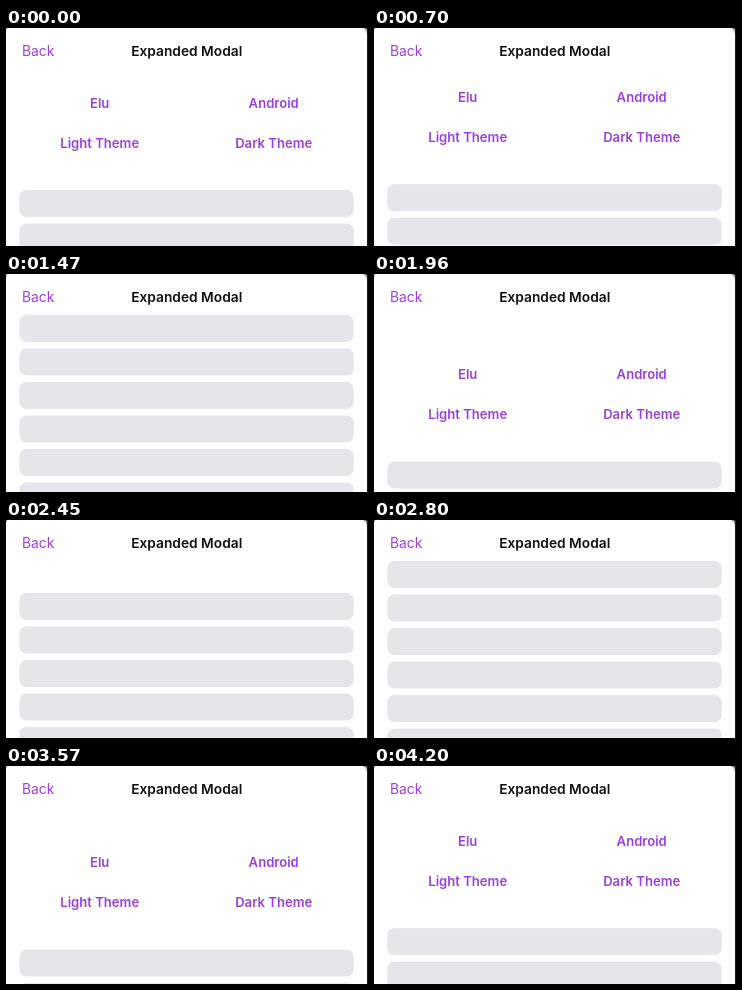
Recreate the animation shown at these times as an HTML page with a canvas. Size 362 by 218 pixels, loop 4.34 s.

```html
<!DOCTYPE html>
<html lang="en">
<head>
<meta charset="utf-8">
<title>Expanded Modal</title>
<style>
  html, body { margin: 0; width: 100%; height: 100%; overflow: hidden; background: #fff; }
  canvas { display: block; }
</style>
</head>
<body>
<canvas id="stage" width="362" height="218"></canvas>
<script>
const W = 362, H = 218, LOOP = 4340, STEP = 70;
const HEADER = 40.5, FIRST_BAR = 162, PITCH = 33.5;
const SCROLL_END = 121, OVERSHOOT = 25.5, PULL_TIME = 490;
const PURPLE = '#9a3fdb', INK = '#101012', BAR = '#e5e5ea';
const FONT = 'Inter, Roboto, sans-serif';
const ctx = document.getElementById('stage').getContext('2d');

// Each rule runs from 0 to 1 over the elapsed milliseconds.
const flick = ms => 1 - Math.exp(-((Math.max(ms, 0) / 235) ** 2.5));

function pull(ms) {
  const u = Math.min(Math.max(ms / PULL_TIME, 0), 1);
  return u < 0.5 ? 16 * u ** 5 : 1 - 16 * (1 - u) ** 5;
}

function bounce(ms) {
  const k = Math.max(ms, 0) / 100;
  return 1 - (1 + k) * Math.exp(-k);
}

// One flick up, then a pull down past the start and a spring back.
function swipe(t, up, down) {
  return SCROLL_END * flick(t - up)
       - (SCROLL_END + OVERSHOOT) * pull(t - down)
       + OVERSHOOT * bounce(t - down - PULL_TIME);
}

const scrollAt = t => swipe(t, 630, 1470) + swipe(t, 2184, 3010);

function label(text, x, y, size, weight, color, align = 'center') {
  ctx.font = `${weight} ${size}px ${FONT}`;
  ctx.fillStyle = color;
  ctx.textAlign = align;
  ctx.fillText(text, x, y);
}

function roundRect(x, y, w, h, radius, color) {
  ctx.fillStyle = color;
  ctx.beginPath();
  ctx.roundRect(x, y, w, h, radius);
  ctx.fill();
}

function drawButtons(left, right, y) {
  label(left, 93.7, y, 13.1, 600, PURPLE);
  label(right, 267.7, y, 13.1, 600, PURPLE);
}

function drawContent(scroll) {
  ctx.save();
  ctx.beginPath();
  ctx.rect(0, HEADER, W, H - HEADER);
  ctx.clip();
  ctx.translate(0, -scroll);
  drawButtons('Elu', 'Android', 79.8);
  drawButtons('Light Theme', 'Dark Theme', 119.8);
  for (let y = FIRST_BAR; y < H + scroll; y += PITCH) roundRect(13.3, y, 334.4, 27, 7, BAR);
  ctx.restore();
}

function draw(t) {
  ctx.fillStyle = '#1c1c1e';
  ctx.fillRect(0, 0, W, H);
  roundRect(0, 0, 361, H + 12, 3, '#c8c8cc');
  roundRect(0, -1, 361, H + 12, [4, 9, 0, 0], '#fff');
  drawContent(scrollAt(t));
  label('Back', 16, 28, 13.8, 400, PURPLE, 'left');
  label('Expanded Modal', 180.7, 28, 13.75, 600, INK);
}

function frame(now) {
  draw(Math.floor((now % LOOP) / STEP) * STEP);
  requestAnimationFrame(frame);
}
requestAnimationFrame(frame);
</script>
</body>
</html>
```
